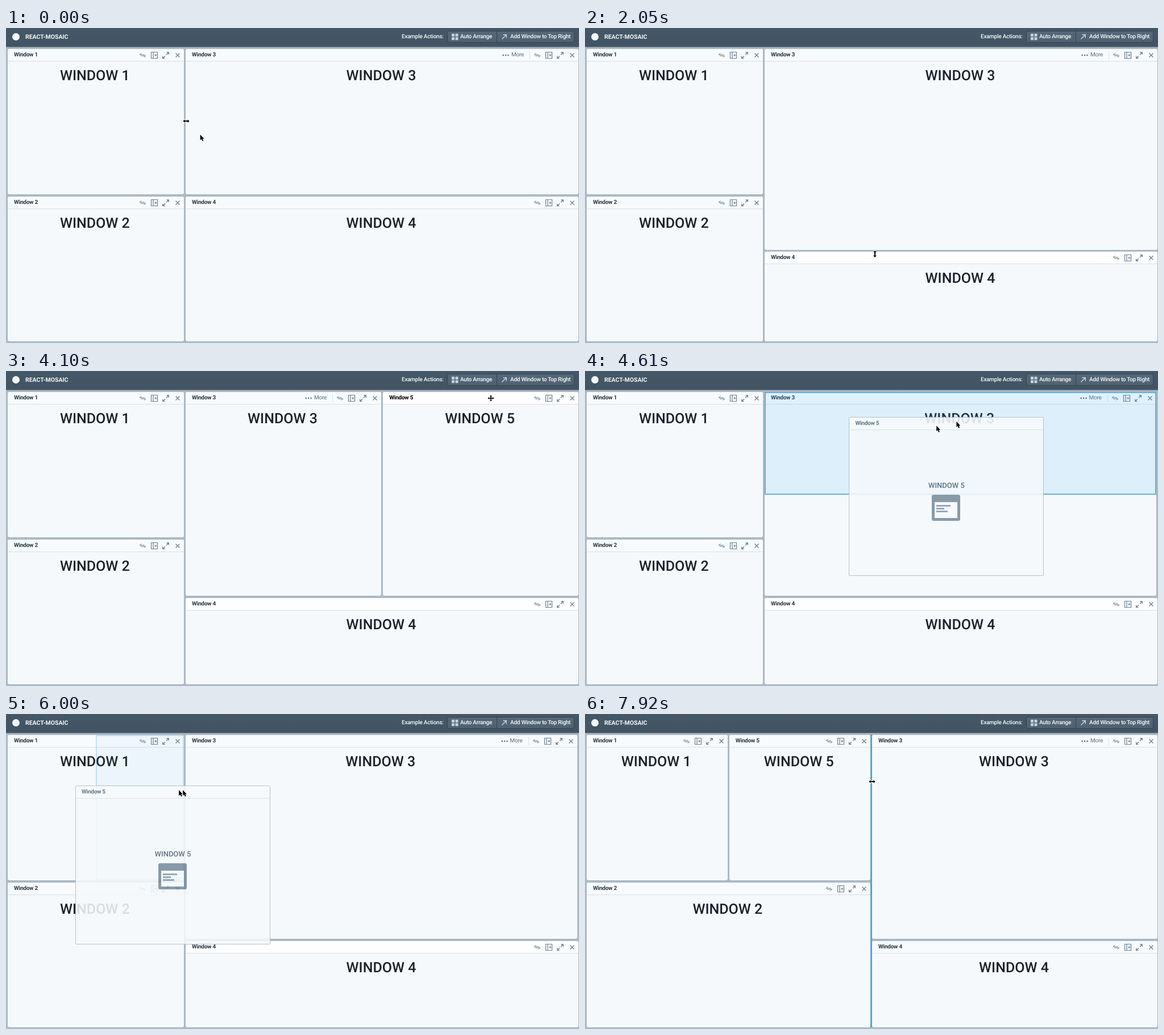
An HTML page for the animation above (8 s loop, 1008 by 555 pixels).

```html
<!DOCTYPE html>
<html lang="en">
<head>
<meta charset="utf-8">
<title>react-mosaic</title>
<style>
html, body { margin: 0; width: 100%; height: 100%; overflow: hidden; }
body { background: #adbac5; font: 500 10px Roboto, "Open Sans", sans-serif; letter-spacing: -.25px;
  text-rendering: geometricPrecision; color: #1a2129; cursor: default; }
div, span, svg { position: absolute; white-space: nowrap; box-sizing: border-box; }
svg { overflow: visible; fill: none; stroke: #6b8090; }
#stage { left: 0; top: 0; width: 1008px; height: 555px; overflow: hidden; }
nav { position: absolute; width: 1008px; height: 33px; color: #f5f8fa;
  background: linear-gradient(#455868, #425464); box-shadow: 0 1px 1px rgba(16,22,26,.3); }
nav span { top: 10px; line-height: 12px; }
.logo { left: 10.5px; top: 8.5px; width: 13px; height: 13px; border-radius: 50%; background: #f5f8fa; }
.brand { left: 34px; font-weight: 700; font-size: 10.5px; letter-spacing: 0; }
.btn { top: 5px; height: 21px; background: linear-gradient(#566878, #506272); border: 1px solid #33424f; }
nav svg { stroke: #c5d1da; }
.win { background: #f5f9fc; border-radius: 3px; overflow: hidden; box-shadow: 0 0 1px rgba(60,80,95,.2); }
.bar { left: 0; right: 0; top: 0; height: 22px; background: #f8fbfd; border-bottom: 1px solid #d9dfe4; }
.label { left: 11px; top: 5px; line-height: 12px; font-weight: 700; color: #293742; }
.icons { right: 0; top: 11px; }
.more { right: 96px; top: 5px; line-height: 12px; color: #5c7080; font-weight: 400; }
.sep { right: 85px; top: 4px; width: 1px; height: 14px; background: #dce2e7; }
.title { left: 0; right: 3px; top: 33px; line-height: 30px; text-align: center; font-size: 25px; letter-spacing: 0; }
.line { background: #5ba2ca; }
#target { background: rgba(72,175,240,.17); border: 2px solid #4aa6d6; }
#preview { width: 343px; height: 280px; opacity: .87; background: #f5f9fc; border: 1px solid #aebbc5; border-radius: 2px; }
#preview .label { color: #52626f; }
#preview .title { right: 0; top: 111px; line-height: 20px; font-size: 13px; color: #4f6170; }
#cursors path { fill: #000; stroke: #fff; stroke-width: 1.6; paint-order: stroke; stroke-linejoin: round; }
</style>
</head>
<body>
<div id="stage">
  <nav>
    <div class="logo"></div>
    <span class="brand">REACT-MOSAIC</span>
    <span style="left:696px">Example Actions:</span>
    <div class="btn" style="left:776px;width:88px;border-radius:3px 0 0 3px"></div>
    <div class="btn" style="left:863px;width:137px;border-radius:0 3px 3px 0"></div>
    <svg style="left:784px;top:10px"><path d="M0 2.5h5m1.5 0h5M0 8.8h5m1.5 0h5" stroke-width="5"/></svg>
    <span style="left:799px">Auto Arrange</span>
    <svg style="left:872px;top:11px"><path d="M.5 8.5L8 1M2.5.8H8.3V6.5" stroke-width="1.5"/></svg>
    <span style="left:887px">Add Window to Top Right</span>
  </nav>
  <div id="wins"></div>
  <div class="line" id="hline"></div>
  <div class="line" id="vline"></div>
  <div id="target"></div>
  <div id="preview">
    <div class="bar"></div>
    <span class="label" style="left:10px">Window 5</span>
    <span class="title">WINDOW 5</span>
    <svg style="left:145px;top:136px">
      <rect width="50" height="46" rx="3" fill="#788d9c" stroke="none"/>
      <rect x="5" y="13" width="40" height="28" fill="#f5f9fc" stroke="none"/>
      <path d="M8 19.5h25M8 24.5h14M8 29.5h20" stroke="#788d9c" stroke-width="2.4"/>
    </svg>
  </div>
  <svg id="cursors" width="1008" height="555" style="left:0;top:0"><path id="ghost"/><path id="cursor"/></svg>
</div>
<script>
const LOOP = 8000, LAG = 60, GAP = 1.6;
const TOP = 37, BOTTOM = 552, RIGHT = 1007, MID_Y = 295;
const SPLIT = 3400, DRAG = 4280, DROP = 6390;
const $ = id => document.getElementById(id);

const ICONS = `<svg class="icons" width="1" height="1"><g transform="translate(1 0)">
  <path d="M-74.5-3.5l-3.5 2.5h9M-70.5 3.5l3.5-2.5h-9"/>
  <path d="M-57.5-5.5h11v11h-11zM-54-5.5v11M-51.8 0h4.2M-49.7-2v4" stroke-width="1.2"/>
  <path d="M-31-.8l4-4M-30.5-5h3.8v3.8M-33 1.2l-4 4M-33.5 5.3h-3.8V1.5" stroke-width="1.3"/>
  <path d="M-14.5-3.5l7 7m0-7l-7 7" stroke-width="1.4"/></g></svg>`;
const MORE = `<span class="more">More</span><div class="sep"></div>
  <svg class="icons" width="1" height="1"><path d="M-131.3 0h0m4.4 0h0m4.4 0h0" stroke-width="2.8" stroke-linecap="round"/></svg>`;

const wins = [1, 2, 3, 4, 5].map(n => {
  const el = document.createElement('div');
  el.className = 'win';
  el.innerHTML = `<div class="bar"><span class="label">Window ${n}</span>${n === 3 ? MORE : ''}${ICONS}</div>
    <span class="title">WINDOW ${n}</span>`;
  $('wins').append(el);
  return el;
});

const SHAPES = {
  arrow: 'M0 0V10L2.3 8 4 11.6 5.7 10.9 4.2 7.4H7Z',
  ew: 'M-5.5 0l3-3v2h5v-2l3 3-3 3v-2h-5v2Z',
  ns: 'M0-6l3 3h-2v6h2l-3 3-3-3h2v-6h-2Z',
  move: 'M0-5.5l2 2.5H.8V-.8H3V-2l2.5 2-2.5 2V.8H.8V3H2L0 5.5-2 3h1.2V.8H-3V2L-5.5 0-3-2v1.2H-.8V-3H-2Z'
};

// Pointer strokes: start, end, x, y
const strokes = [
  [-10, 60, 402, 246], [200, 650, 507, 289],       // wander to the row divider
  [830, 890, 510, MID_Y], [1470, 2230, 510, 404],  // drag it down
  [2280, 3200, 955, 47], [3460, 4040, 853, 48],    // split window 3, grab window 5
  [DRAG, 5230, 445, 132], [5700, 6010, 304, 134],  // carry it over to window 1
  [DROP, 6860, 304, 121], [6900, 7150, 316, 119],
  [7450, 7920, 505, 119]                           // drag the column divider
];

const clamp = v => Math.max(0, Math.min(1, v));
const ease = (t, a, b) => 1 - (1 - clamp((t - a) / (b - a))) ** 2;

const pointer = t => strokes.reduce(([x, y], [a, b, nx, ny]) => {
  const p = ease(t, a, b);
  return [x + (nx - x) * p, y + (ny - y) * p];
}, [317, 164]);

function kind(t) {
  if (t < 0 || t > 7060) return 'ew';
  if (t >= 830 && t < 2280) return 'ns';
  return t > 4010 && t < DRAG ? 'move' : 'arrow';
}

function box(el, l, t, r, b, opacity = 1) {
  Object.assign(el.style, { left: l + 'px', top: t + 'px', width: r - l + 'px', height: b - t + 'px', opacity });
}

function drawCursor(el, t) {
  el.setAttribute('d', SHAPES[kind(t)]);
  el.setAttribute('transform', `translate(${pointer(t)})`);
}

function dropTarget(t, col, row, right) {
  const left = col + GAP;
  const show = (since, ...area) => box($('target'), ...area, clamp((t - since) / 250));
  if (t > 5930) show(5930, (1 + col) / 2, TOP, col - GAP, MID_Y - GAP);
  else if (t > 4700) show(4700, left, TOP, (left + right) / 2, row - GAP);
  else show(4400, left, TOP, right, (TOP + row) / 2);
}

function render(t) {
  const row = MID_Y + 103 * ease(t, 1470, 2230);
  const col = 314.4 + 189 * ease(t, 7450, 7920);
  const dragging = t >= DRAG && t < DROP, dropped = t >= DROP;
  const right = dragging ? RIGHT - 2.5 : RIGHT;
  const half = (1 + col) / 2, mid = (col + 1009) / 2;
  const split = t >= SPLIT && t < DRAG;
  const [w1, w2, w3, w4, w5] = wins;

  box(w1, 3, TOP, (dropped ? half : col) - GAP, MID_Y - GAP);
  box(w2, 3, MID_Y + GAP, col - GAP, BOTTOM);
  box(w3, col + GAP, TOP, split ? mid - GAP : right, row - GAP);
  box(w4, col + GAP, row + GAP, RIGHT, BOTTOM);
  if (dropped) box(w5, half + GAP, TOP, col - GAP, MID_Y - GAP);
  else box(w5, mid + GAP, TOP, RIGHT, row - GAP);
  w5.hidden = !split && !dropped;
  w5.style.display = w5.hidden ? 'none' : '';

  const hover = t >= 3980 && split;
  w4.firstChild.style.background = t > 1500 && t < 7450 ? '#fefefe' : '';
  w5.firstChild.style.background = hover ? '#fff' : '';
  w5.querySelector('.label').style.color = hover ? '#000' : '';

  // A divider lights up while the pointer is on it
  const [x, y] = pointer(t);
  const glow = (shape, gap) => kind(t) === shape ? clamp(5 - Math.abs(gap)) : 0;
  box($('hline'), col + GAP, row - 1.5, RIGHT, row + 1.5, glow('ns', y - row));
  box($('vline'), col - 1.5, 36, col + 1.5, BOTTOM, glow('ew', x - col));

  $('target').style.display = $('preview').style.display = dragging ? '' : 'none';
  if (dragging) {
    dropTarget(t, col, row, right);
    const [px, py] = pointer(t - LAG);
    Object.assign($('preview').style, { left: px - 189 + 'px', top: py - 8 + 'px' });
  }

  drawCursor($('cursor'), t);
  drawCursor($('ghost'), kind(t) === 'arrow' ? t - LAG : t);
}

const start = performance.now();
function tick() {
  render((performance.now() - start) % LOOP);
  requestAnimationFrame(tick);
}
tick();
</script>
</body>
</html>
```
